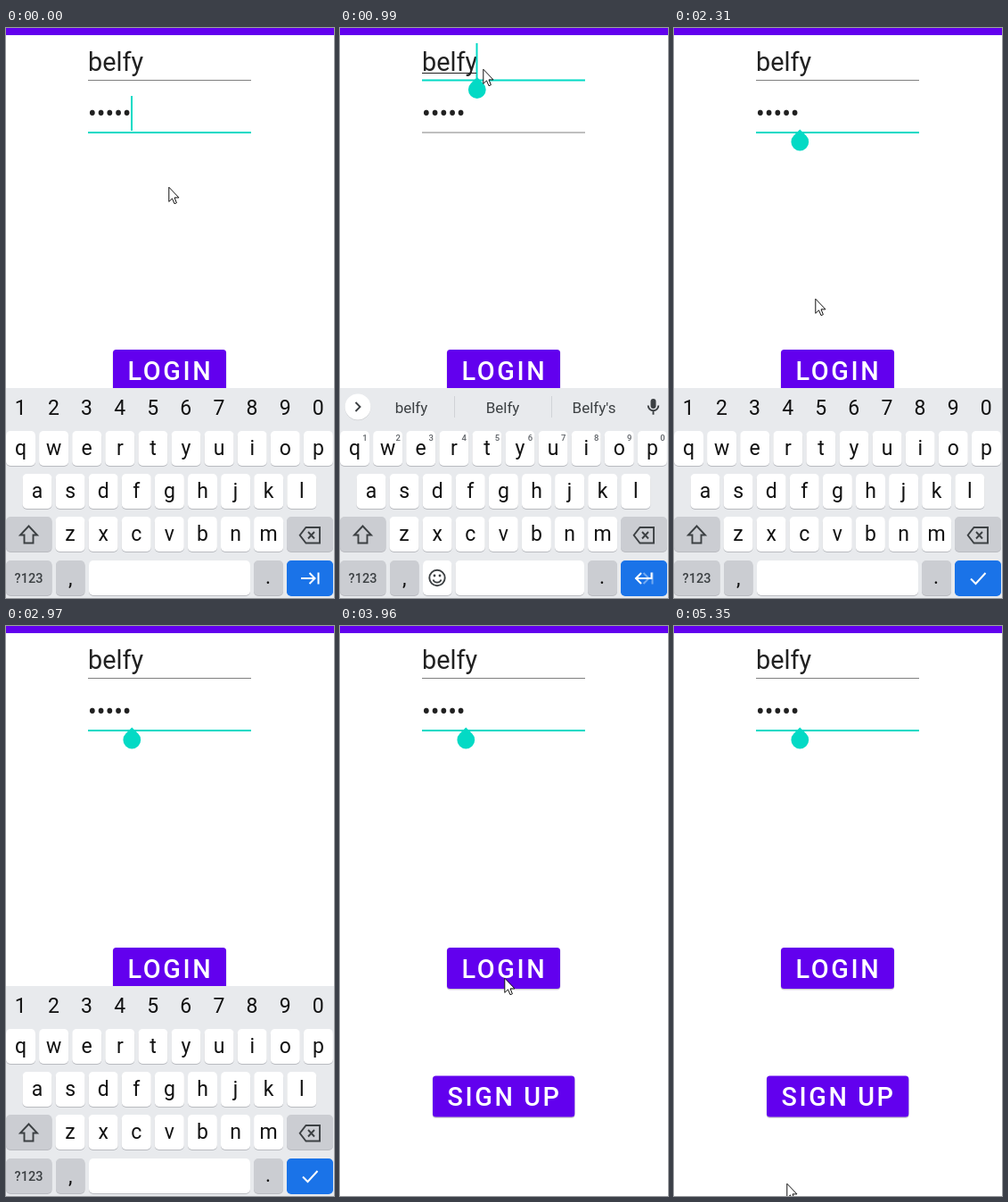
Write an HTML page that moves like this. It is 368x638 px and loops after 5.41 s.

```html
<!DOCTYPE html>
<html lang="en">
<head>
<meta charset="utf-8">
<title>Login form</title>
<style>
  html, body { margin: 0; width: 100%; height: 100%; overflow: hidden; background: #fff; }
  svg { display: block; width: 368px; height: 638px; font-family: Roboto, sans-serif; }
  .field { font-size: 28.8px; fill: #212121; }
  .btn { font-size: 28.8px; font-weight: 500; letter-spacing: 2.57px; fill: #fff; }
  .key { font-size: 23px; fill: #111; text-anchor: middle; }
  .word { font-size: 17px; fill: #3c4043; text-anchor: middle; }
  .hint { font-size: 9.5px; font-weight: 500; fill: #5f6368; text-anchor: middle; }
  .mode { font-size: 14.5px; font-weight: 500; fill: #3c4043; text-anchor: middle; }
  .icon { fill: none; stroke: #3c4043; stroke-width: 1.9; }
  .go { fill: none; stroke: #fff; stroke-width: 2; }
</style>
</head>
<body>
<svg id="stage" viewBox="0 0 368 638"></svg>
<script>
const NS = 'http://www.w3.org/2000/svg';
const LOOP = 5410, TICK = 66, LAST = 81;
const PURPLE = '#6200ee', TEAL = '#03dac5', GREY = '#cbcdd2', BLUE = '#1a73e8';
const NAME = 'belfy', NAME_CAP = 'Belfy';
const PITCH = 37.1;

function add(parent, tag, attrs, text) {
  const el = document.createElementNS(NS, tag);
  for (const a in attrs) el.setAttribute(a, attrs[a]);
  if (text) el.textContent = text;
  parent.appendChild(el);
  return el;
}
const group = parent => add(parent, 'g', {});
const rect = (p, x, y, width, height, fill, rx = 0) => add(p, 'rect', { x, y, width, height, fill, rx });
const text = (p, cls, x, y, s) => add(p, 'text', { class: cls, x, y }, s);
const path = (p, d, attrs) => add(p, 'path', { d, ...attrs });
const show = (el, on) => el.setAttribute('display', on ? 'inline' : 'none');

const stage = document.getElementById('stage');
rect(stage, 0, 0, 368, 8, PURPLE);

// Text fields
function makeField(value, baseline, lineY, caretX, caretY) {
  text(stage, 'field', 92, baseline, value);
  const idle = rect(stage, 92, lineY + 0.5, 183, 1, '#808080');
  const active = rect(stage, 92, lineY, 183, 2, TEAL);
  const caret = rect(stage, caretX - 1, caretY, 2, 39, TEAL);
  const handle = path(stage, 'M0 -14L7 -7A9.9 9.9 0 1 1 -7 -7Z',
    { fill: TEAL, transform: `translate(${caretX + 0.3} ${lineY + 11.5})` });
  return { idle, active, caret, handle };
}
const user = makeField(NAME, 48, 57.5, 153.5, 17);
const composing = rect(stage, 92, 50, 61, 1, '#212121');
const pass = makeField('•••••', 106, 116, 141, 76);

// Buttons
function makeButton(x, y, w, label) {
  rect(stage, x, y + 1.6, w, 46, '#00000022', 3.5);
  rect(stage, x - 0.5, y + 0.8, w + 1, 46, '#00000018', 3.5);
  rect(stage, x, y, w, 46, PURPLE, 3.5);
  text(stage, 'btn', x + 16.6, y + 34, label);
}
makeButton(120, 360, 127, 'LOGIN');
makeButton(104, 503.4, 159.3, 'SIGN UP');

// Keyboard
const board = group(stage);
rect(board, 0, 403, 368, 235, '#e8eaed');
const rowY = r => Math.floor(451 + r * 48.4);
function keycap(p, x, r, w, fill = '#fff', shade = '#b9bbc0') {
  rect(p, x, rowY(r) + 1, w, 39, shade, 5);
  rect(p, x, rowY(r), w, 39, fill, 5);
}
['qwertyuiop', 'asdfghjkl', 'zxcvbnm'].forEach((row, r) => {
  const first = [16.5, 35, 72][r];
  [...row].forEach((ch, i) => {
    const x = first + i * PITCH;
    keycap(board, x - 16.5, r, 33);
    text(board, 'key', x, rowY(r) + 26.5, ch);
  });
});
keycap(board, 0, 2, 51.5, GREY);
path(board, 'M25.5 557.5L35 567.5H30.5V576.5H20.5V567.5H16Z', { class: 'icon' });
keycap(board, 315, 2, 52, GREY);
path(board, 'M336.5 559H352V576.5H336.5L329.7 567.75ZM339 564l7 7.5m0 -7.5l-7 7.5', { class: 'icon' });
keycap(board, 0, 3, 51.5, GREY);
text(board, 'mode', 25.5, 621, '?123');
keycap(board, 56, 3, 32.5, GREY);
text(board, 'key', 72.3, 624, ',');
keycap(board, 278, 3, 33, GREY);
text(board, 'key', 294, 622, '.');
keycap(board, 315, 3, 52, BLUE, BLUE);

const digits = group(board), words = group(board);
keycap(digits, 93, 3, 181);
keycap(words, 93, 3, 32.5);
keycap(words, 129.5, 3, 144.5);
[...'1234567890'].forEach((d, i) => {
  text(digits, 'key', 16.3 + i * PITCH, 433, d);
  text(words, 'hint', 28 + i * PITCH, 461.5, d);
});

add(words, 'circle', { cx: 20, cy: 424.8, r: 14.5, fill: '#00000020' });
add(words, 'circle', { cx: 20, cy: 424, r: 14.5, fill: '#fff' });
path(words, 'M17.5 419l5 5 -5 5', { class: 'icon' });
[[80, NAME], [182.5, NAME_CAP], [285, NAME_CAP + "'s"]].forEach(([x, s]) => text(words, 'word', x, 431, s));
rect(words, 128, 412, 1, 24, '#d0d3d7');
rect(words, 237, 412, 1, 24, '#d0d3d7');
rect(words, 348.5, 415, 6, 11, '#3c4043', 3);
path(words, 'M345.7 422.5a5.8 5.8 0 0 0 11.6 0M351.5 428.3v4.5', { class: 'icon' });
add(words, 'circle', { cx: 109, cy: 615.5, r: 8.7, class: 'icon' });
path(words, 'M104.5 617.5a4.8 4.8 0 0 0 9 0', { class: 'icon' });
for (const cx of [106, 112]) add(words, 'circle', { cx, cy: 613, r: 1.4, fill: '#3c4043' });

const goNext = path(board, 'M331 616H346M340.5 610l6 6 -6 6M350.5 609.5v13', { class: 'go' });
const goBack = path(board, 'M349.5 609.5v6.5H332M338 610l-6 6 6 6', { class: 'go' });
const goDone = path(board, 'M333 616.5l5.5 5.5 11 -12', { class: 'go' });

// Mouse pointer
const pointer = path(stage, 'M.8 1.2V17.4L4.5 13.9L7 19.7L9.4 18.7L7 12.9H12Z',
  { fill: '#fff', stroke: '#111', 'stroke-width': 1 });

// tick, x, y
const route = [
  [0, 182, 177], [9, 160, 44], [14, 160, 44], [15, 160, 45], [21, 157, 101],
  [24, 157, 103], [26, 157, 103], [31, 160, 290], [34, 160, 290], [43, 96, 642],
  [53, 130, 642], [57, 160, 547], [59, 160, 547], [60, 184, 393], [61, 184, 393],
  [65, 175, 540], [68, 171, 510], [75, 165, 498], [79, 165, 498], [81, 126, 623]
];
// tick, drop, opacity
const slide = [[0, 0, 1], [50, 45.5, 0.52], [51, 98, 0.28], [52, 142, 0.1], [53, 235, 0]];
// ticks where the visible caret toggles: [from, to)
const userCaret = [[8, 16]];
const passCaret = [[0, 8], [22, 31], [38, 45], [53, 60], [68, 75]];

const within = (spans, n) => spans.some(([a, b]) => n >= a && n < b);

function pointerAt(n) {
  const i = Math.max(1, route.findIndex(p => p[0] >= n));
  const [a, ax, ay] = route[i - 1], [b, bx, by] = route[i];
  const u = (n - a) / (b - a), e = u * u * (3 - 2 * u);
  return [ax + (bx - ax) * e, ay + (by - ay) * e];
}

function setField(f, focused, caret, handle) {
  show(f.idle, !focused);
  show(f.active, focused);
  show(f.caret, caret);
  show(f.handle, handle);
}

function draw(n) {
  const onUser = n >= 8 && n < 22;
  setField(user, onUser, within(userCaret, n), n >= 10 && n < 24);
  setField(pass, !onUser, within(passCaret, n), n >= 24);
  show(composing, n >= 11 && n < 22);

  const typing = n >= 10 && n < 23;
  show(words, typing);
  show(digits, !typing);
  show(goNext, n < 23);
  goNext.setAttribute('opacity', typing ? 0.4 : 1);
  show(goBack, typing);
  show(goDone, n >= 23);

  const [, drop, alpha] = slide.filter(s => s[0] <= n).pop();
  board.setAttribute('transform', `translate(0 ${drop})`);
  board.setAttribute('opacity', alpha);
  show(board, alpha > 0);

  const [x, y] = pointerAt(n);
  pointer.setAttribute('transform', `translate(${Math.round(x)} ${Math.round(y)})`);
}

const start = performance.now();
function loop() {
  const t = (performance.now() - start) % LOOP;
  draw(Math.min(LAST, Math.floor((t + 6) / TICK)));
  requestAnimationFrame(loop);
}
draw(0);
requestAnimationFrame(loop);
</script>
</body>
</html>
```
